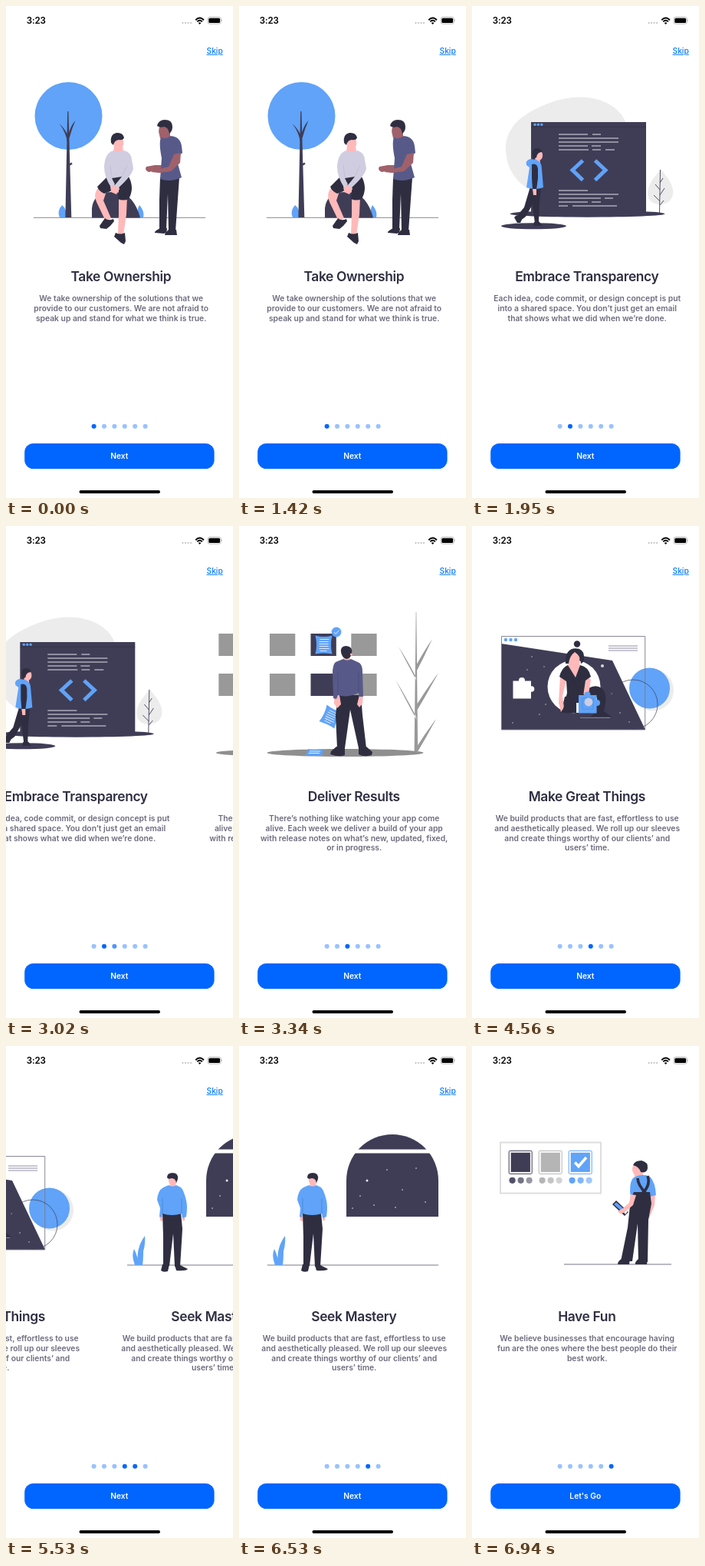
An HTML page that plays this animation: 296 by 640 pixels, repeating every 6.98 s.

```html
<!DOCTYPE html>
<html lang="en">
<head>
<meta charset="utf-8">
<title>Onboarding</title>
<style>
  html, body { margin: 0; width: 100%; height: 100%; overflow: hidden; background: #fff; }
  svg { display: block; width: 100vw; height: 100vh; font-family: Inter, "Liberation Sans", sans-serif; }
  .title { font-size: 17.4px; font-weight: 600; letter-spacing: -.36px; fill: #2f2e41; text-anchor: middle; }
  .body { font-size: 10.3px; font-weight: 600; fill: #6d6b7d; text-anchor: middle; }
  .label { font-size: 10.26px; font-weight: 600; fill: #fff; text-anchor: middle; }
  .skip { font-size: 10.26px; font-weight: 500; fill: #087cff; text-decoration: underline; text-anchor: end; }
  .clock { font-size: 11.6px; font-weight: 600; letter-spacing: -.2px; }
</style>
</head>
<body>
<svg id="stage" viewBox="0 0 296 640"></svg>
<script>
const W = 296, LOOP = 6980;
const INK = '#3f3d56', DARK = '#2f2e41', BLUE = '#60a3f8', SKIN = '#ffb9b9',
      BROWN = '#a0616a', SLATE = '#575a89', LILAC = '#d0cde1', PALE = '#ececec', GREY = '#999';

const fill = (d, c) => `<path d="${d}" fill="${c}"/>`;
const line = (d, c, w = 1) => `<path d="${d}" fill="none" stroke="${c}" stroke-width="${w}"/>`;
const rect = (x, y, w, h, c, r = 0) => `<rect x="${x}" y="${y}" width="${w}" height="${h}" rx="${r}" fill="${c}"/>`;
const oval = (x, y, rx, ry, c) => `<ellipse cx="${x}" cy="${y}" rx="${rx}" ry="${ry}" fill="${c}"/>`;
const disc = (x, y, r, c) => oval(x, y, r, r, c);
const text = (cls, x, y, s) => `<text class="${cls}" x="${x}" y="${y}">${s}</text>`;
const trio = (x, y, step, r, c) => [0, 1, 2].map(i => disc(x + i * step, y, r, c)).join('');

function benchScene() {
  return disc(81.5, 143, 44, BLUE)
    + line('M36 275.3H260', '#8d8583')
    + fill('M70 275Q66 267 73 259Q80 264 78 275Z', BLUE)
    + fill('M172 275Q170 265 174 259Q181 267 179 275Z', BLUE)
    + fill('M80.2 137H81.4L85.3 275H77.4Z', INK)
    + fill('M80 177Q78 164 69.5 153Q77 160 81 169ZM81 168Q84 156 90.5 149Q86 159 82.5 172Z', INK)
    + line('M82 207L86 204.5', INK, 2.5)
    + fill('M112 275.5V263Q113 252 122 245Q132 240 150 243Q168 249 175 275.5Z', INK)
    // seated figure
    + fill('M122 235L131 241L127 253L137 276L130 280L119 257Q112 244 122 235Z', SKIN)
    + fill('M147 246L158 247L157 271L153 298L146 297L147 271Z', SKIN)
    + fill('M129 276Q133 280 140 277L141 280L136 286L131 290L123 289L122 286Z', DARK)
    + fill('M143 295Q149 298 155 295L156 306L154 310L150 308L141 300Z', DARK)
    + fill('M132 222L119 235Q121 241 128 244L147 237L146 251Q153 254 160 251Q168 237 160 222Z', DARK)
    + fill('M136 234L146 232L148 238L144 245L137 242Z', SKIN)
    + fill('M141 181H152L153 190L147 194L140 190Z', SKIN)
    + fill('M140 188Q147 191 154 188Q163 190 164 200L166 211Q165 220 146 237L142 233L151 222L138 224L142 232L137 236Q128 222 128 209Q129 191 140 188Z', LILAC)
    + line('M136 207L138 223M158 207L151 222', '#bdb9d2', .7)
    + oval(147, 178, 6.3, 8.3, SKIN)
    + fill('M137 178Q135 167 144 165Q152 164 154 171Q153 175 147 174Q141 175 140 181Z', DARK)
    // standing figure
    + fill('M199 163Q207 168 214 163L214 172L208 176L201 172Z', BROWN)
    + fill('M201 223H226L224 251L221 293H212L211 244L209 291H200L200 252Z', DARK)
    + fill('M201 289H210Q210 295 206 296L194 295Q193 293 201 289ZM212 291H222L223 298H207Q207 295 212 291Z', DARK)
    + fill('M203 207L194 207L183 209Q180 213 186 216L202 213ZM204 211L194 211L190 216L199 217L212 215L226 204L224 195Z', BROWN)
    + fill('M202 171Q208 174 215 169Q227 170 229 182L230 191L222 198L229 223Q214 230 201 225L203 198Q199 178 202 171Z', SLATE)
    + fill('M219 193L228 191L227 204L215 215L200 217L200 212L212 209Z', BROWN)
    + oval(206.5, 161.5, 7.3, 8.5, BROWN)
    + fill('M197 156Q199 148 207 148Q217 148 217 157Q217 163 213 166Q212 158 206 157Q201 159 197 156Z', DARK);
}

function codeScene() {
  const rows = [
    [167, 113, 151, 157, 168], [172, 113, 191], [177, 113, 191], [182, 113, 151, 156, 168], [187, 113, 152, 157, 168, 174, 186],
    [240, 113, 151], [245, 113, 191], [250, 113, 168, 173, 184], [255, 113, 151, 156, 168], [260, 113, 125, 131, 189]
  ];
  const code = rows.map(([y, ...xs]) => {
    let d = '';
    for (let i = 0; i < xs.length; i += 2) d += `M${xs[i]} ${y}H${xs[i + 1]}`;
    return d;
  }).join('');
  return fill('M44 187C43 154 72 137 101 126C133 114 169 116 190 136C208 153 205 178 207 210C203 239 169 252 126 252C75 251 45 224 44 187Z', PALE)
    + oval(150.5, 270.3, 101, 4.4, INK) + oval(80.5, 286.3, 42.5, 4, INK)
    + rect(77, 151, 150, 119, INK) + line('M77 157.2H227', DARK, .6)
    + trio(82, 154.2, 4.4, 1.7, BLUE)
    + line(code, '#e2e2ea', 1.2)
    + line('M144.5 201L131 213.5L144.5 226.5M160.5 201L174 213.5L160.5 226.5', BLUE, 5)
    // bare sapling
    + fill('M246 212C253 221 264 233 262 245C260 254 253 258 245 258C235 258 228 252 229 241C231 229 239 222 246 212Z', PALE)
    + line('M245.5 213L244.5 269M245 230L249 224M245 239L239 232M245 246L251 237M245 254L237 246M245 259L250 253', INK, .9)
    // walker
    + fill('M76 235H90L88 256L87 279L88 283H82L79 258L70 274L62 280L57 275L68 262Z', DARK)
    + fill('M58 272L65 278L63 282L59 282L55 275ZM81 281H88L92 286H80Z', DARK)
    + oval(87.5, 194.3, 4.6, 6.3, SKIN) + fill('M82 196H88L89 205L83 205Z', SKIN)
    + fill('M79 193Q78 185 85 185Q92 186 91 190Q85 190 84 197L80 199Z', DARK)
    + fill('M71 207Q69 201 76 199L84 200Q91 203 91 212L93 236Q83 240 71 236L75 210Z', BLUE)
    + fill('M78 206Q85 204 86 212L86 224L84 239H79L78 224Z', DARK)
    + fill('M79 238H84L84 246H80Z', SKIN);
}

function boardScene() {
  const tiles = [40, 93.5, 146.3].map((x, i) => [140, 192].map(y => rect(x, y, 33.3, 29, i === 1 ? INK : GREY)).join('')).join('');
  const branches = [[195, 208, 157], [183, 252, 147], [235, 260, 191], [246, 204, 200], [290, 257, 251]]
    .map(([y, x, top]) => `M230 ${y}Q${(230 + x) / 2} ${(y + top) / 2 - 2} ${x} ${top}Q${(230 + x) / 2 + 1} ${(y + top) / 2 + 4} 231.5 ${y + 6}Z`).join('');
  const sheet = fill('M-11 -12Q0 -9 11 -12Q8 0 11 12Q0 10 -11 12Q-8 0 -11 -12Z', BLUE)
    + line('M-5 -7H7M-6 -4H6M-6 -1H6M-6 2H6M-6 5H7M-5 8H4', '#e6f0ff', .9);
  return tiles
    + `<g transform="translate(110.5 154.5)">${sheet}</g>`
    + disc(127, 138, 6.4, BLUE) + line('M124 138L126.2 140.4L130.4 135.6', '#dfecff', 1)
    + oval(138.5, 295, 102, 5, '#8f8f8f')
    + fill('M230.7 112H231.3L233.2 293H228.6Z' + branches, GREY)
    + fill('M90 290Q99 292 110 290L108 299Q98 297 87 299Z', BLUE)
    + line('M92 293H106M91 295.5H105', '#e6f0ff')
    + `<g transform="translate(119.5 248) rotate(25)">${sheet}</g>`
    // viewer seen from behind
    + fill('M129 220H159L161 246L166 289H156L145 239L138 289H128L126 246Z', DARK)
    + fill('M127 287H138L138 298Q131 301 119 297L120 293ZM156 287H166L174 294L173 298Q163 301 156 297Z', DARK)
    + fill('M124 220H131L133 232L128 237L124 231ZM157 220L162 219L161 231L157 236L154 232Z', SKIN)
    + fill('M136 167H145V178H136Z', SKIN)
    + fill('M136 173Q141 176 146 173L157 178Q161 181 161 190L162 222H157L156 217Q142 224 129 220L127 225L123 224L122 192Q122 180 126 177Z', SLATE)
    + line('M129 191L129 219M156 191L156 217', '#494c78', .7)
    + fill('M133 164Q132 156 140 156Q149 157 147 166Q145 173 140 173Q134 171 133 164Z', DARK)
    + disc(146.4, 167, 1.5, SKIN);
}

function puzzleScene() {
  const stars = [[78, 170], [94, 183], [170, 182], [182, 218], [96, 232], [53, 256], [88, 245], [193, 243], [72, 187], [205, 255]]
    .map(([x, y], i) => disc(x, y, i === 2 ? 2 : .7, '#d6d5df')).join('');
  return disc(236, 213.5, 27, PALE)
    + disc(231.5, 211, 26.5, BLUE)
    + fill('M38 153L183 175L226 265H38Z', INK)
    + line('M38.5 143.5H225.7V265H38.5Z', '#7d7b8c', .9)
    + trio(44, 148, 6.5, 2.2, BLUE)
    + line('M178 156H216M178 159H216M178 162H216', '#86849a', .9)
    + stars
    + `<circle cx="210" cy="232" r="32" fill="none" stroke="${INK}" stroke-width=".7"/>`
    + disc(133, 209, 34.5, '#fff')
    + rect(53.5, 201.5, 23.5, 23, '#fff') + disc(65, 201, 4, '#fff') + disc(77.5, 212, 3.8, '#fff')
    // seated woman
    + fill('M142 219Q158 203 169 211Q178 218 172 241L182 248H154L163 242L163 222L154 244L116 243L121 222Z', DARK)
    + fill('M115 195L123 200L118 221L120 236L116 242L113 230Z', SKIN)
    + fill('M149 194L155 200L152 219L148 222L145 218Z', SKIN)
    + fill('M127 174H140L141 184L135 197L125 183Z', SKIN)
    + fill('M125 181L135 197L141 181Q152 183 155 196L148 201L145 221L142 242H118L124 217L123 202L114 196Q117 184 125 181Z', DARK)
    + oval(133.5, 171.5, 7, 8.6, SKIN)
    + fill('M122 179Q121 162 132 159.5Q145 158 146 169Q147 177 142 179Q142 169 134 164Q127 169 126 179Z', DARK)
    + disc(137, 153.5, 4.2, DARK)
    + rect(136, 230, 4, 13, '#eee')
    + rect(139, 220, 23.5, 23.5, BLUE) + disc(150.5, 219.5, 4, BLUE) + disc(163, 230, 4, BLUE)
    + line('M144 224H158V238H144Z', '#4a8ddd', .7)
    + disc(152, 229, 5.4, LILAC)
    + line('M141 249.5H180', '#8b899c', .9);
}

function windowScene() {
  const stars = [[167, 175], [158, 195], [148, 211], [176, 207], [193, 161], [213, 187], [231, 159], [243, 203], [204, 210]]
    .map(([x, y], i) => disc(x, y, i ? .8 : 1.5, '#e8e8ef')).join('');
  return fill('M140 222V175A60 60 0 0 1 260 175V222Z', INK)
    + rect(138, 134.5, 124, 5, '#fff') + stars
    + line('M37 285H260', '#6d6b7d', .9)
    + fill('M47 285Q42 273 46 264Q51 274 52 285ZM51 285Q48 263 60 247Q61 257 58 267Q58 278 57 285Z', BLUE)
    // onlooker
    + fill('M83 217H107L109 238L106 287H99L97 244L92 286H84L84 248Z', DARK)
    + fill('M83 284H92L90 293Q84 295 81 292ZM99 285H106L116 290Q114 293 101 292Z', DARK)
    + fill('M79 220L83 220L83 228L80 227ZM109 220L113 219L112 227L109 227Z', SKIN)
    + rect(92.5, 175, 7.5, 9, SKIN)
    + fill('M91 181Q96 184 101 181L107 184Q111 188 114 201Q116 209 114 222L109 224L108 218Q95 222 83 218L82 223L79 222L80 211L76 200Q77 188 84 184Z', BLUE)
    + line('M83 198L83 218M108 198L108 218', '#4487da', .8)
    + oval(96.5, 174, 5.7, 7.3, SKIN)
    + fill('M89 171Q89 165 96 165Q104 165 103 173L101 178Q100 172 95 172Q90 174 89 171Z', DARK);
}

function paletteScene() {
  const swatch = (x, c) => `<rect x="${x}" y="136.3" width="30" height="30" rx="1.5" fill="#fff" stroke="${c}"/>`
    + rect(x + 2.5, 138.7, 25.2, 25.2, c)
    + [1, .8, .6].map((o, i) => `<g opacity="${c === INK ? o * .9 : o}">${disc(x + 4.4 + i * 11, 174.8, 4.1, c)}</g>`).join('');
  return '<rect x="37" y="125.5" width="131" height="66" fill="#fff" stroke="#dedede" stroke-width="2"/>'
    + swatch(48.2, INK) + swatch(87.2, '#b5b5b5') + swatch(126.2, BLUE)
    + line('M134.2 151.5L139 156.5L149 145', '#fff', 3.6)
    + line('M120 284H260', '#77758a')
    // painter
    + fill('M232 192L239 193L238 207L231 224L226 225L229 209Z', SKIN)
    + fill('M211 164L222 162L224 173L213 174Z', SKIN)
    + fill('M211 171Q222 165 232 170Q239 177 240 194L232 196L229 205H208L207 197L206 189Q206 174 211 171Z', BLUE)
    + fill('M207 198L211 190L232 190L234 205L230 226L229 281H217L216 231L209 280H194L203 236Z', DARK)
    + fill('M195 277H206L205 284H190Q190 280 195 277ZM217 277H229L228 284H213Q212 281 217 277Z', DARK)
    + line('M216 172Q216 181 228 193M229 169Q234 183 218 195', DARK, 3.6)
    + fill('M183 206L188 201L204 216L199 221Z', DARK) + fill('M185 206L188 203.3L197 211L194 214Z', BLUE)
    + fill('M197 215L199 212L203 215L200 219Z', '#fff')
    + fill('M207 193L214 194L210 207L198 217L193 218L190 215L197 211L205 204Z', SKIN)
    + oval(214.8, 160.5, 5.8, 7.8, SKIN)
    + fill('M210 155Q212 149 221 149Q230 151 229 159Q228 166 220 164Q218 157 210 155Z', DARK);
}

const craft = ['We build products that are fast, effortless to use', 'and aesthetically pleased. We roll up our sleeves',
  'and create things worthy of our clients’ and', 'users’ time.'];
const pages = [
  [benchScene, 'Take Ownership', ['We take ownership of the solutions that we', 'provide to our customers. We are not afraid to', 'speak up and stand for what we think is true.']],
  [codeScene, 'Embrace Transparency', ['Each idea, code commit, or design concept is put', 'into a shared space. You don’t just get an email', 'that shows what we did when we’re done.']],
  [boardScene, 'Deliver Results', ['There’s nothing like watching your app come', 'alive. Each week we deliver a build of your app', 'with release notes on what’s new, updated, fixed,', 'or in progress.']],
  [puzzleScene, 'Make Great Things', craft],
  [windowScene, 'Seek Mastery', craft],
  [paletteScene, 'Have Fun', ['We believe businesses that encourage having', 'fun are the ones where the best people do their', 'best work.']]
];

const pageMarkup = ([scene, title, lines], i) => `<g transform="translate(${i * W})">${scene()}`
  + text('title', 149.8, 357.7, title)
  + lines.map((s, k) => text('body', 150.2, 384.2 + k * 12.65, s)).join('') + '</g>';

const statusBar = text('clock', 26.8, 23, '3:23')
  + [231, 234.5, 238, 241.5].map(x => disc(x - .5, 22, 1, '#b8b8b8')).join('')
  + line('M247.3 18.2Q252.6 12.9 257.9 18.2M249.3 20.4Q252.6 17.2 255.9 20.4', '#000', 2)
  + fill('M250.8 22Q252.6 20.4 254.4 22L252.6 24Z', '#000')
  + '<rect x="263" y="14.4" width="17.4" height="8.8" rx="2.6" fill="none" stroke="#aaa" stroke-width=".8"/>'
  + rect(264.3, 15.7, 14.8, 6.2, '#000', 1.5) + fill('M281.4 17.3Q283 18.8 281.4 20.3Z', '#aaa');

document.getElementById('stage').innerHTML = `<g id="track">${pages.map(pageMarkup).join('')}</g>`
  + statusBar + `<g id="skip">${text('skip', 282.8, 61.8, 'Skip')}</g>`
  + '<g id="dots">' + pages.map((_, i) => disc(114.6 + i * 13.4, 546.8, 3, '#99c2ff')).join('') + '</g>'
  + rect(24.2, 569, 247.4, 33, '#0066ff', 11.5)
  + '<text id="label" class="label" x="147.8" y="589.3"></text>'
  + rect(95.5, 630, 105.5, 4, '#000', 2);

const [track, skip, dots, label] = ['track', 'skip', 'dots', 'label'].map(id => document.getElementById(id));

// Each swipe: start, end and number of picture updates
const swipes = [[1420, 1950, 6], [2900, 3340, 5], [4130, 4560, 5], [5310, 5850, 6], [6530, 6940, 5]];
const clamp = v => Math.max(0, Math.min(1, v));
const smooth = u => u * u * (3 - 2 * u);

function swipeProgress(t, [start, end, count]) {
  if (t < start) return 0;
  if (t >= end) return 1;
  const step = (end - start) / (count - 1);
  return smooth(clamp(Math.floor((t - start) / step) * step / 385));
}

function draw(now) {
  const t = now % LOOP;
  const pos = swipes.reduce((sum, s) => sum + swipeProgress(t, s), 0);
  const last = pos > 4.5;
  track.setAttribute('transform', `translate(${-pos * W})`);
  [...dots.children].forEach((dot, i) => {
    const on = clamp((1 - Math.abs(i - pos)) * 2.4);
    dot.setAttribute('fill', `rgb(${153 * (1 - on)},${194 - 92 * on},255)`);
  });
  skip.style.display = last ? 'none' : '';
  label.textContent = last ? 'Let\'s Go' : 'Next';
}

function tick(now) {
  draw(now);
  requestAnimationFrame(tick);
}
draw(0);
requestAnimationFrame(tick);
</script>
</body>
</html>
```
